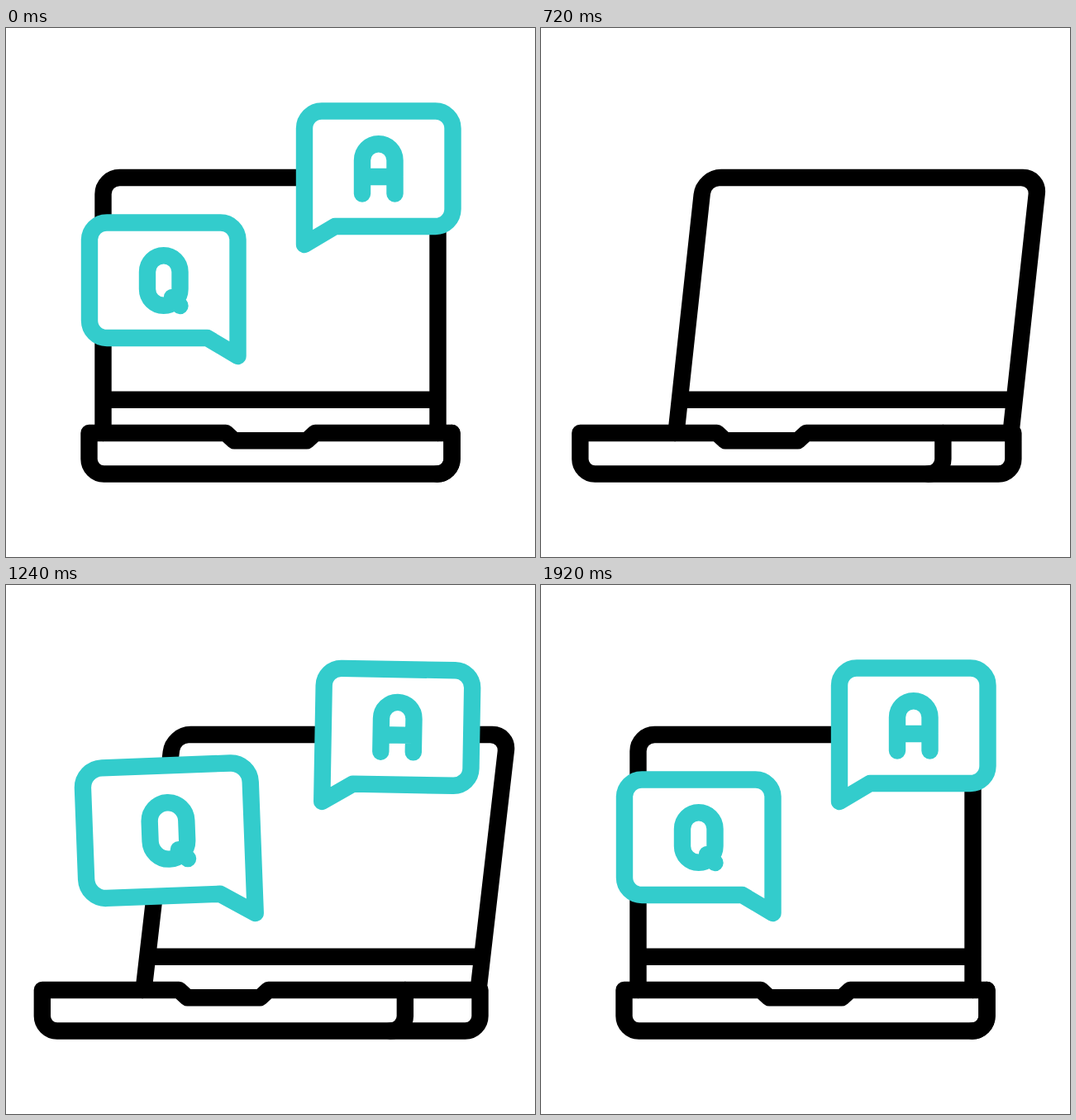
Animation, 640 px wide and 640 px high, one loop 2080 ms. Source, as an HTML page:

```html
<!DOCTYPE html>
<html lang="en">
<head>
<meta charset="utf-8">
<title>Questions and answers</title>
<style>
html, body { margin: 0; height: 100%; overflow: hidden; background: #fff; }
svg { display: block; width: 100%; height: 100%; }
path { fill: none; stroke-linecap: round; stroke-linejoin: round; }
.fill { fill: #fff; }
</style>
</head>
<body>
<svg viewBox="0 0 640 640">
  <g stroke="#000" stroke-width="20.4">
    <path id="screen" d="M117.5 490V201a20 20 0 0 1 20-20H502.5a20 20 0 0 1 20 20V490M117.5 449.8H522.5"/>
    <path id="side"/>
    <path id="front" d="M100.5 490H266l10 9.3H364l10-9.3H539.5V521.5a18 18 0 0 1-18 18H118.5a18 18 0 0 1-18-18Z"/>
  </g>
  <!-- Each bubble is drawn around the tip of its tail. -->
  <g id="q" stroke="#3cc">
    <path class="fill" d="M0 0V-140.5a21 21 0 0 0-21-21H-158.5a21 21 0 0 0-21 21V-43a21 21 0 0 0 21 21H-37Z"/>
    <path d="M-109.5-102a19.75 19.75 0 0 1 39.5 0V-81a19.75 19.75 0 0 1-39.5 0ZM-79.5-71l9.5 10"/>
  </g>
  <g id="a" stroke="#3cc">
    <path class="fill" d="M0 0V-140.5a21 21 0 0 1 21-21H158.5a21 21 0 0 1 21 21V-43a21 21 0 0 1-21 21H37Z"/>
    <path d="M70-61.5V-102a19.75 19.75 0 0 1 39.5 0V-61.5M70-82H109.5"/>
  </g>
</svg>
<script>
const LOOP = 2080, STEP = 40, STROKE = 20.4, POP = 695;
const el = id => document.getElementById(id);
const progress = (t, from, to) => Math.min(1, Math.max(0, (t - from) / (to - from)));
const smooth = u => u * u * (3 - 2 * u);
const swing = u => u < .5 ? (2 * u) ** 2.7 / 2 : 1 - (2 - 2 * u) ** 2.7 / 2;

// Eased value through [time, value] keys
function track(t, keys) {
  let value = keys[0][1];
  for (let i = 1; i < keys.length; i++) {
    const [from, a] = keys[i - 1], [to, b] = keys[i];
    if (t >= from) value = a + (b - a) * smooth(progress(t, from, to));
  }
  return value;
}

const scaleKeys = [[POP, 0], [1010, 1.245], [1240, 1]];
const turnKeys = [[POP, 0], [760, 5], [970, -6.6], [1240, 1], [1400, 0]];
const fadeKeys = [[740, 0], [900, 1]];

// Fly off the top, then pop back in at the tail
function poseBubble(id, x, y, t) {
  let scale = 1, turn = 0, fade = 1;
  if (t < POP) {
    y -= 31.5 * (Math.max(0, t) / 200) ** 2.42;
  } else {
    scale = Math.max(.01, track(t, scaleKeys));
    turn = track(t, turnKeys);
    fade = track(t, fadeKeys);
  }
  const g = el(id);
  g.setAttribute('transform', `translate(${x} ${y}) rotate(${turn}) scale(${scale})`);
  g.setAttribute('stroke-width', STROKE / scale);
  g.setAttribute('opacity', fade);
}

function draw(now) {
  const t = Math.floor(now % LOOP / STEP) * STEP;
  const d = 62 * (swing(progress(t, 110, 1000)) - swing(progress(t, 1000, 1920)));
  const skew = .002036 * d;
  el('screen').setAttribute('transform', `matrix(1 0 ${-skew} 1 ${1.863 * d} 0)`);
  el('front').setAttribute('transform', `translate(${-d} 0)`);
  el('side').setAttribute('d',
    `M${539.5 - d} 490H${539.5 + .6 * d}V521.5a18 18 0 0 1-18 18H${521.5 - d}`);
  poseBubble('q', 280.5 + .375 * d, 397, t - 120);
  poseBubble('a', 361 + .375 * d, 262, t);
}

let start;
function tick(now) {
  start ??= now;
  draw(now - start);
  requestAnimationFrame(tick);
}
draw(0);
requestAnimationFrame(tick);
</script>
</body>
</html>
```
